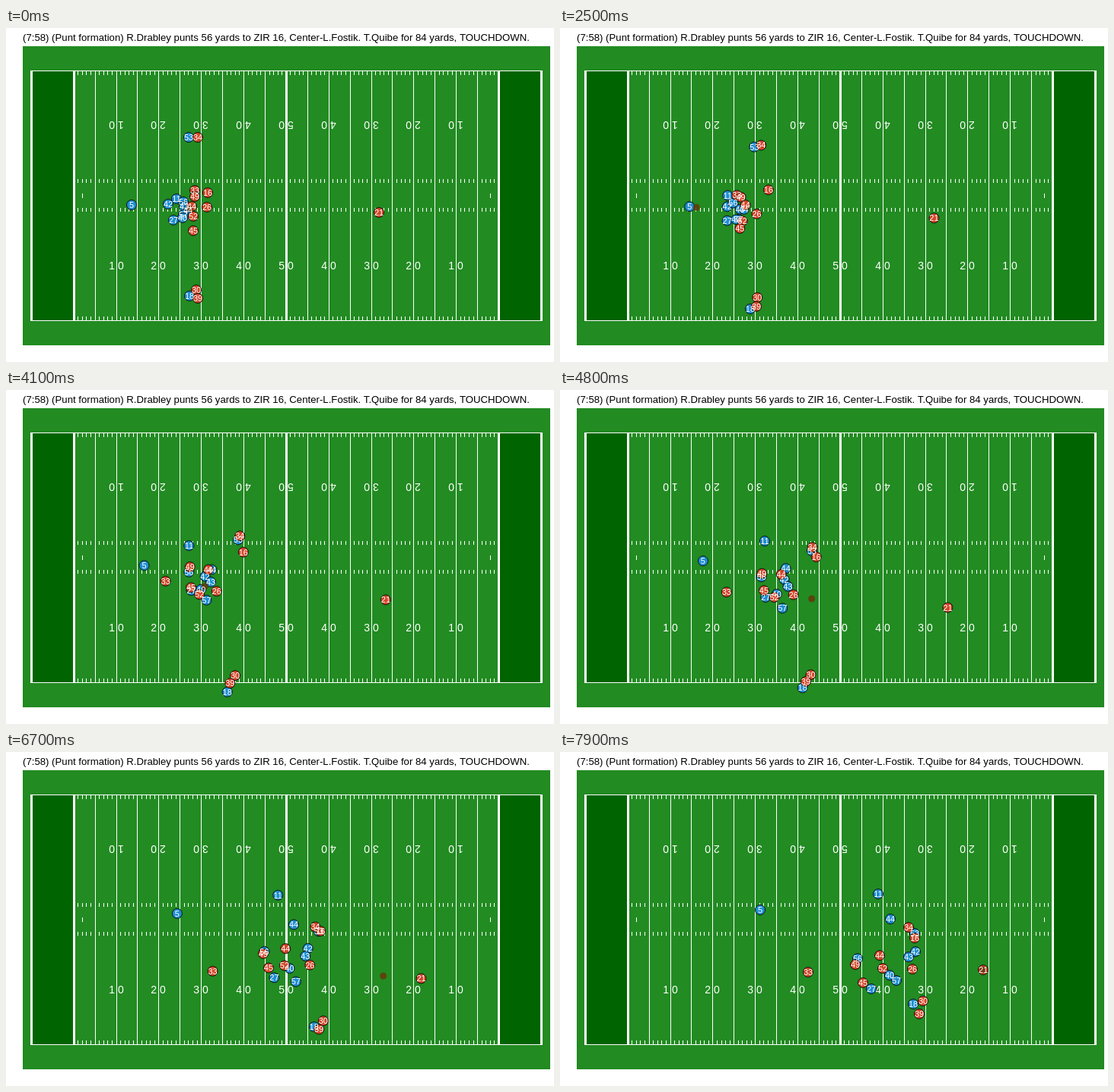
An HTML page with a canvas that plays this animation: 720 by 440 pixels, repeating every 8000 ms.

```html
<!DOCTYPE html>
<html lang="en">
<head>
<meta charset="utf-8">
<title>Punt return</title>
<style>
  html, body { margin: 0; width: 720px; height: 440px; overflow: hidden; background: #fff; }
  canvas { display: block; }
</style>
</head>
<body>
<canvas id="stage" width="720" height="440"></canvas>
<script>
const ctx = document.getElementById('stage').getContext('2d');
const FONT = '"Liberation Sans", Arial, sans-serif';
const LOOP = 8000, STEP = 100;
const SNAP = 1250, HANDS = 1950, PUNT = 3430, CATCH = 7500;
const TURN = 3300, END = 7900;
const RED = 'rgb(210,70,40)', BLUE = 'rgb(30,142,208)';

const lerp = (a, b, u) => a + (b - a) * u;
const part = (t, from, to) => Math.min(1, Math.max(0, (t - from) / (to - from)));
const arc = u => u * (1 - u);

// How a player covers the ground downfield
const run = u => u ** 1.17;
const jog = u => u * u;
const glide = u => u * u * (3 - 2 * u);

// Each player leaves the formation (x0, y0) at the snap, turns at (x1, y1)
// and heads for (x2, y2) on a path that sags by bend halfway.
const players = [];
const add = (color, number, x0, y0, x1, y1, x2, y2, bend = 3, pace = run) =>
  players.push({ color, number, x0, y0, x1, y1, x2, y2, bend, pace });
const blue = (...args) => add(BLUE, ...args);
const red = (...args) => add(RED, ...args);

blue(5, 165, 233, 179, 239, 263, 208, -12, jog);
blue(11, 224, 225, 214, 213, 418, 187, -8);
blue(42, 213, 232, 231, 241, 467, 263);
blue(56, 233, 229, 218, 233, 391, 272);
blue(43, 234, 235, 241, 245, 458, 270, 8);
blue(44, 239, 240, 246, 237, 434, 220);
blue(27, 220, 253, 219, 255, 409, 312);
blue(57, 233, 246, 237, 262, 442, 301, 17);
blue(40, 232, 250, 230, 256, 433, 294);
blue(53, 240, 144, 281, 178, 466, 239, 20);
blue(18, 241, 353, 265, 399, 464, 332, 13);

red(34, 252, 144, 285, 172, 458, 231, 22);
red(33, 248, 214, 206, 231, 326, 290, 33, jog);
red(49, 248, 222, 220, 224, 388, 280);
red(16, 265, 217, 289, 207, 466, 245);
red(44, 244, 235, 243, 230, 420, 268);
red(26, 264, 236, 249, 260, 463, 286);
red(52, 246, 248, 229, 265, 424, 285);
red(45, 246, 267, 220, 259, 398, 304, -8);
red(30, 250, 345, 275, 372, 477, 328, 17);
red(39, 252, 356, 268, 385, 472, 345, 11);
red(21, 490, 243, 494, 263, 556, 287, 20, glide);

const punter = players.find(p => p.number === 5);
const returner = players.find(p => p.number === 21);

function spot(p, t) {
  if (t < TURN) {
    const u = part(t, SNAP, TURN) ** 2;
    return [lerp(p.x0, p.x1, u), lerp(p.y0, p.y1, u)];
  }
  const u = part(t, TURN, END), v = p.pace(u);
  return [lerp(p.x1, p.x2, v), lerp(p.y1, p.y2, v) + 4 * p.bend * arc(u)];
}

function held(t) {
  const [x, y] = spot(punter, t);
  return [x + lerp(8, 11, part(t, HANDS, PUNT)), y + 1];
}

function ballSpot(t) {
  if (t >= CATCH) return spot(returner, t);
  if (t >= PUNT) {
    const [x0, y0] = held(PUNT), [x1, y1] = spot(returner, CATCH);
    const u = part(t, PUNT, CATCH);
    return [lerp(x0, x1, u + 0.22 * arc(u)), lerp(y0, y1, u + 1.5 * arc(u))];
  }
  if (t >= HANDS) return held(t);
  const [x, y] = held(HANDS), u = part(t, SNAP, HANDS);
  return [lerp(241, x, u), lerp(238, y, u)];
}

function rect(color, x, y, w, h) {
  ctx.fillStyle = color;
  ctx.fillRect(x, y, w, h);
}
const white = (x, y, w, h) => rect('#fff', x, y, w, h);

function text(str, x, y, size, color, align = 'center') {
  ctx.font = `${size}px ${FONT}`;
  ctx.fillStyle = color;
  ctx.textAlign = align;
  ctx.fillText(str, x, y);
}

function disc(x, y, r, color) {
  ctx.beginPath();
  ctx.arc(x, y, r, 0, 2 * Math.PI);
  ctx.fillStyle = color;
  ctx.fill();
}

const yardX = yard => Math.floor(89.18 + 5.584 * yard);

function drawField() {
  white(0, 0, 720, 440);
  text('(7:58) (Punt formation) R.Drabley punts 56 yards to ZIR 16, Center-L.Fostik. ' +
    'T.Quibe for 84 yards, TOUCHDOWN.', 22, 17, 13.2, '#000', 'left');
  rect('#228b22', 22, 24, 693, 394);
  rect('#006400', 34, 56, 55, 329);
  rect('#006400', 648, 56, 55, 329);

  for (const y of [56, 385]) white(32, y, 673, 1);
  for (const x of [32, 702]) white(x, 56, 3, 330);
  for (let yard = 0; yard <= 100; yard++) {
    const x = yardX(yard);
    if (yard % 50 === 0) white(x - 1, 56, 3, 329);
    else if (yard % 5 === 0) white(x, 56, 1, 329);
    else for (const y of [57, 199, 237, 380]) white(x, y, 1, 5);
  }
  for (const yard of [2, 98]) white(yardX(yard), 218, 1, 6);

  for (let yard = 10; yard < 100; yard += 10) {
    const label = Math.min(yard, 100 - yard) / 10 + ' 0';
    const x = yardX(yard);
    text(label, x, 318, 14, '#fff');
    ctx.save();
    ctx.translate(x, 123);
    ctx.rotate(Math.PI);
    text(label, 0, 0, 14, '#fff');
    ctx.restore();
  }
}

function draw(t) {
  drawField();
  ctx.strokeStyle = '#111';
  ctx.lineWidth = 1;
  for (const p of players) {
    disc(...spot(p, t), 6.5, p.color);
    ctx.stroke();
  }
  disc(...ballSpot(t), 4.5, 'rgba(101,55,10,.85)');
  for (const p of players) {
    const [x, y] = spot(p, t);
    text(p.number, x, y + 4, 11, '#fff');
  }
}

function frame() {
  draw(Math.floor(performance.now() % LOOP / STEP) * STEP);
  requestAnimationFrame(frame);
}
frame();
</script>
</body>
</html>
```
